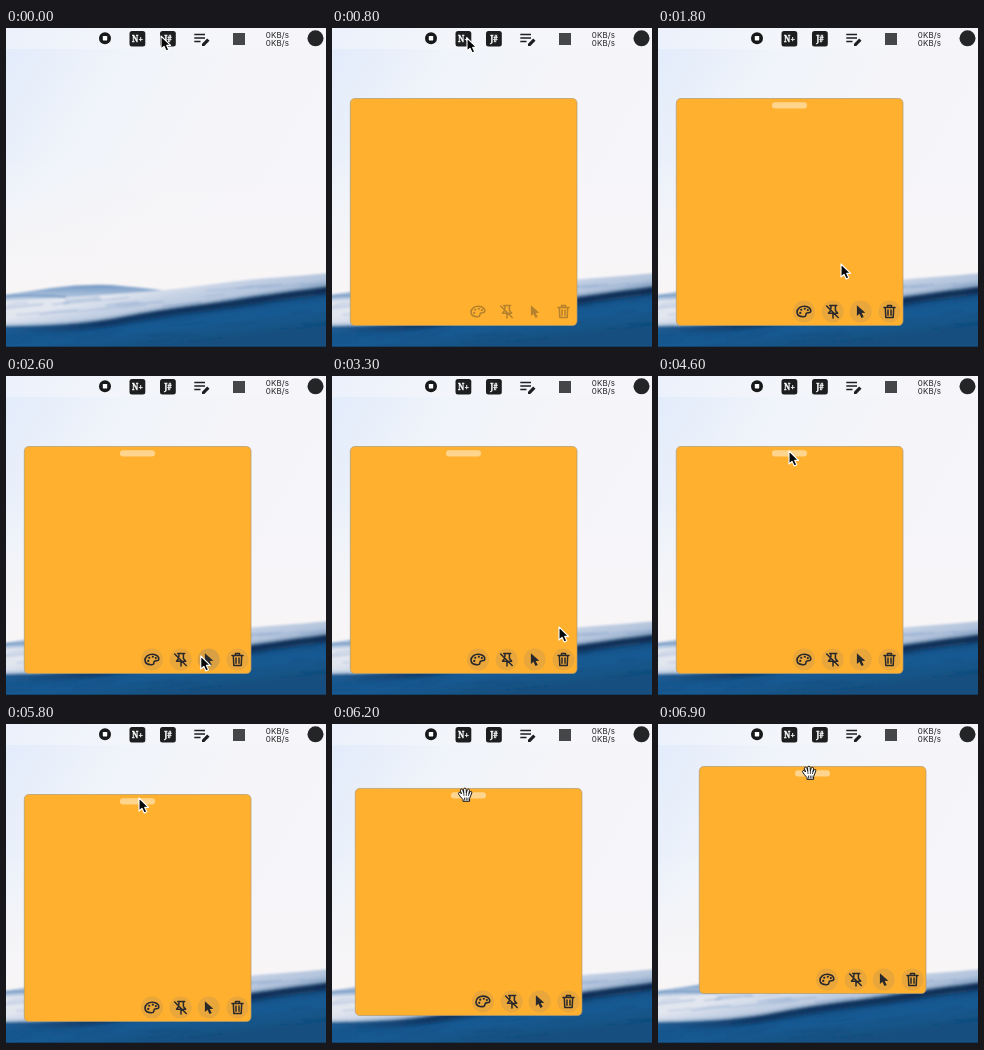
These frames come from a looping animation (320x320 px, 7000 ms). An HTML page:

```html
<!DOCTYPE html>
<html lang="en">
<head>
<meta charset="utf-8">
<title>Sticky note</title>
<style>
html, body { margin: 0; width: 100%; height: 100%; overflow: hidden; background: #f4f6fb; }
svg { display: block; width: 100vw; height: 100vh; }
.rate { font: 400 8px Inter, Roboto, sans-serif; letter-spacing: .1px; fill: #222; }
.tile { font: 900 8px "Noto Serif", "Liberation Serif", serif; fill: #fff; stroke: #fff; stroke-width: .3; text-anchor: middle; }
.line { fill: none; stroke: #29282b; stroke-linecap: round; stroke-linejoin: round; }
</style>
</head>
<body>
<svg viewBox="0 0 320 320" xmlns="http://www.w3.org/2000/svg">
  <defs>
    <linearGradient id="sky" x1="0" y1="0.1" x2="0.85" y2="0.6">
      <stop offset="0" stop-color="#e3ecfb"/>
      <stop offset=".32" stop-color="#f0f4fa"/>
      <stop offset=".65" stop-color="#f5f5f9"/>
      <stop offset="1" stop-color="#f6f5fa"/>
    </linearGradient>
    <linearGradient id="haze" x1="0" y1="0" x2="0" y2="1">
      <stop offset="0" stop-color="#f8f5f6" stop-opacity="0"/>
      <stop offset="1" stop-color="#f8f5f6"/>
    </linearGradient>
    <linearGradient id="far" gradientUnits="userSpaceOnUse" x1="0" y1="256" x2="0" y2="274">
      <stop offset="0" stop-color="#6f96c2"/>
      <stop offset=".35" stop-color="#8fadd0"/>
      <stop offset="1" stop-color="#c6d4e7"/>
    </linearGradient>
    <linearGradient id="swell" gradientUnits="userSpaceOnUse" x1="150" y1="258" x2="157" y2="291">
      <stop offset="0" stop-color="#e2e6ef"/>
      <stop offset=".4" stop-color="#c6d2e5"/>
      <stop offset=".8" stop-color="#b3c4dc"/>
      <stop offset="1" stop-color="#9fb5d2"/>
    </linearGradient>
    <linearGradient id="deep" gradientUnits="userSpaceOnUse" x1="150" y1="280" x2="155" y2="320">
      <stop offset="0" stop-color="#17528a"/>
      <stop offset=".5" stop-color="#165a92"/>
      <stop offset="1" stop-color="#124f7f"/>
    </linearGradient>
    <linearGradient id="crest" gradientUnits="userSpaceOnUse" x1="0" y1="0" x2="320" y2="0">
      <stop offset="0" stop-color="#1d5c94"/>
      <stop offset=".3" stop-color="#0e3661"/>
      <stop offset="1" stop-color="#0c2c50"/>
    </linearGradient>
    <filter id="soft" x="-10%" y="-30%" width="120%" height="160%"><feGaussianBlur stdDeviation="1.3"/></filter>
    <filter id="blur" x="-10%" y="-30%" width="120%" height="160%"><feGaussianBlur stdDeviation="2"/></filter>
  </defs>

  <rect width="320" height="320" fill="url(#sky)"/>
  <rect y="130" width="320" height="140" fill="url(#haze)"/>
  <g filter="url(#soft)">
    <path d="M-5 267Q20 264 45 260Q75 256 105 257Q130 259 165 263L165 285L-5 290Z" fill="url(#far)"/>
    <path d="M-5 273C30 271 60 270 95 267C145 264 180 260 215 255C255 250 285 249 325 245V310H-5Z" fill="url(#swell)"/>
    <path d="M-5 269Q25 266 60 269" fill="none" stroke="#6a93c0" stroke-width="1.6"/>
    <path d="M-5 299C50 299 85 296 120 289C165 280 205 277 245 270C275 266 300 262 325 259V325H-5Z" fill="url(#deep)"/>
    <g id="ripples" fill="none"></g>
  </g>
  <path d="M-5 302C50 302 85 299 120 292C165 283 205 280 245 273C275 269 300 265 325 262" fill="none" stroke="url(#crest)" stroke-width="7" filter="url(#blur)"/>
  <rect y="318.7" width="320" height="1.3" fill="#15191f"/>

  <rect width="320" height="21" fill="#f7f8fc" opacity=".5"/>
  <circle cx="99" cy="10.2" r="6" fill="#17181a"/>
  <rect x="96.8" y="8" width="4.4" height="4.4" rx=".6" fill="#fff"/>
  <rect x="123.5" y="2.9" width="15.8" height="15.6" rx="2.5" fill="#1d1e20"/>
  <text class="tile" x="131.5" y="13.7">N+</text>
  <rect x="154" y="2.9" width="15.8" height="15.6" rx="2.5" fill="#1d1e20"/>
  <text class="tile" x="162" y="13.7">J#</text>
  <path d="M188.3 6.5H199M188.3 10H199M188.3 13.5H194.5" stroke="#1d1e20" stroke-width="1.6"/>
  <path d="M196 18V15.7L201.2 10.5L203.5 12.8L198.3 18Z" fill="#1d1e20"/>
  <rect x="227" y="5" width="12" height="12" fill="#454648"/>
  <text class="rate" x="259.8" y="9.8">0KB/s</text>
  <text class="rate" x="259.8" y="18.2">0KB/s</text>
  <circle cx="309.5" cy="10.3" r="8" fill="#242527"/>

  <g id="note">
    <rect x="18.3" y="70.5" width="226.7" height="227" rx="4.5" fill="#ffb02e" stroke="#b09a70" stroke-width=".7"/>
    <rect id="grip" x="114" y="74.2" width="35" height="6.4" rx="3" fill="#fff"/>
    <g id="discs" fill="#77777a"></g>
    <g id="tools">
      <g class="line" transform="translate(146 283.5)">
        <path d="M-7 .8C-7-3-3.6-5.4.5-5.3C4.6-5.2 7.2-2.7 6.8-.2C6.4 2 3.6.6 2.4 1.8C1.2 3.2 3 5-.2 5.2C-4 5.4-7 4-7 .8Z" stroke-width="1.6"/>
        <path d="M-3.8 1.4H-3.7M-2.8-1.8H-2.7M.8-2.7H.9M3.8-1.4H3.9" stroke-width="2.1"/>
      </g>
      <g class="line" transform="translate(174.7 283.5)" stroke-width="1.5">
        <path d="M-3-6H4M-1.8-6V-3M2.7-6V-1L5 1.7H2.5M-2.3-.7L-4.2 1.7H1M.3 2V6.5M-6-5.5L5.5 6"/>
      </g>
      <path transform="translate(202.7 283.5)" d="M-3.8-6.3V4.5L-1.3 2.3L.8 6.5L3 5.4L1 1.5L4.6 1.2Z" fill="#29282b"/>
      <g class="line" transform="translate(231.5 283.5)" stroke-width="1.5">
        <path d="M-5.5-4H5.5M-2-4V-6H2V-4M-4.2-4L-3.7 6H3.7L4.2-4M-1.5-1.5V3.7M1.5-1.5V3.7"/>
      </g>
    </g>
  </g>

  <path id="arrow" d="M0 0V13L3 10.3L5.2 15L7.8 13.8L5.7 9.4H9.6Z" fill="#080808" stroke="#fff" stroke-width="1.1" stroke-linejoin="round"/>
  <g id="hand" stroke="#111" stroke-linecap="round" stroke-linejoin="round">
    <path d="M-4.7 1.5L-6.2-.7C-7.2-2.3-5.3-3.4-4.2-2L-3.4-1L-4.6-4.3C-5-6-2.8-6.5-2.2-5L-1.3-2.3L-1.4-5.5C-1.3-7.2 1-7.2 1.2-5.5L1.4-2.2L2.3-5C2.8-6.4 4.8-6 4.5-4.3L4-1.3L5-3C5.8-4.2 7.3-3.4 6.8-2L4.6 3.5V6.3H-2V4.9Z" fill="#fff"/>
    <path d="M-1.3-2.3L-1 .5M1.4-2.2V.5M4-1.3L3.5.6M-.5 3V5M1.3 3V5M3 3V5" fill="none" stroke-width=".8"/>
  </g>
</svg>
<script>
const LOOP = 7000, STEP = 100, SHOWN = 700, GRAB = 5900;
const $ = id => document.getElementById(id);
const clamp = x => Math.max(0, Math.min(1, x));
const ease = x => { x = clamp(x); return x * x * (3 - 2 * x); };

// time, x, y of the pointer tip
const path = [
  [0, 155, 8], [200, 155, 8], [700, 135, 10], [1000, 135, 10],
  [1800, 183, 236], [2100, 147, 279], [2400, 174, 280], [2700, 202, 280],
  [3000, 229, 279], [3300, 227, 251], [4200, 106, 94], [4600, 131, 75],
  [5800, 133, 74], [5900, 128, 76]
];
const toolX = [146, 174.7, 202.7, 231.5];

function add(parent, name, attrs) {
  const el = document.createElementNS("http://www.w3.org/2000/svg", name);
  for (const key in attrs) el.setAttribute(key, attrs[key]);
  return parent.appendChild(el);
}

const discs = toolX.map(cx => add($("discs"), "circle", { cx, cy: 283.5, r: 11 }));

let seed = 7;
const rand = () => (seed = seed * 16807 % 2147483647) / 2147483647;
for (let i = 0; i < 50; i++) {
  const x = rand() * 330 - 10, w = 15 + rand() * 35, front = i % 2;
  const crest = front ? 305 - x * 0.13 : 273 - x * 0.07;
  const y = crest + 3 + rand() * (front ? 30 : 14);
  add($("ripples"), "path", {
    d: `M${x} ${y}q${w / 2} ${rand() * 3 - 3} ${w} ${-w * 0.1}`,
    stroke: front ? "#0e3d6c" : "#7f9fc8",
    "stroke-width": 1 + rand() * 1.5,
    opacity: front ? 0.2 : 0.35
  });
}

function pointer(t) {
  const i = path.findIndex(p => p[0] > t);
  if (i < 0) return path[path.length - 1].slice(1);
  const [t0, x0, y0] = path[i - 1], [t1, x1, y1] = path[i];
  const k = ease((t - t0) / (t1 - t0));
  return [x0 + (x1 - x0) * k, y0 + (y1 - y0) * k];
}

function draw(t) {
  const drag = ease((t - GRAB) / 1000);
  const dx = 23 * drag, dy = -28 * drag;
  const [x, y] = pointer(t);
  const active = ease((t - 1200) / 300);
  const held = t >= GRAB;

  $("note").style.display = t >= SHOWN ? "" : "none";
  $("note").setAttribute("transform", `translate(${dx} ${dy})`);
  $("grip").setAttribute("opacity", 0.45 * active);
  $("tools").setAttribute("opacity", 0.34 + 0.66 * active);
  discs.forEach((disc, i) => {
    const over = Math.hypot(x - toolX[i], y - 283.5) < 11;
    disc.setAttribute("opacity", active * (over ? 0.28 : 0.17));
  });
  $("arrow").style.display = held ? "none" : "";
  $("hand").style.display = held ? "" : "none";
  $(held ? "hand" : "arrow").setAttribute("transform", `translate(${x + dx} ${y + dy + (held ? 1 : 0)})`);
}

const start = performance.now();
function tick() {
  const t = (performance.now() - start) % LOOP;
  draw(Math.floor(t / STEP) * STEP);
  requestAnimationFrame(tick);
}
draw(0);
requestAnimationFrame(tick);
</script>
</body>
</html>
```
